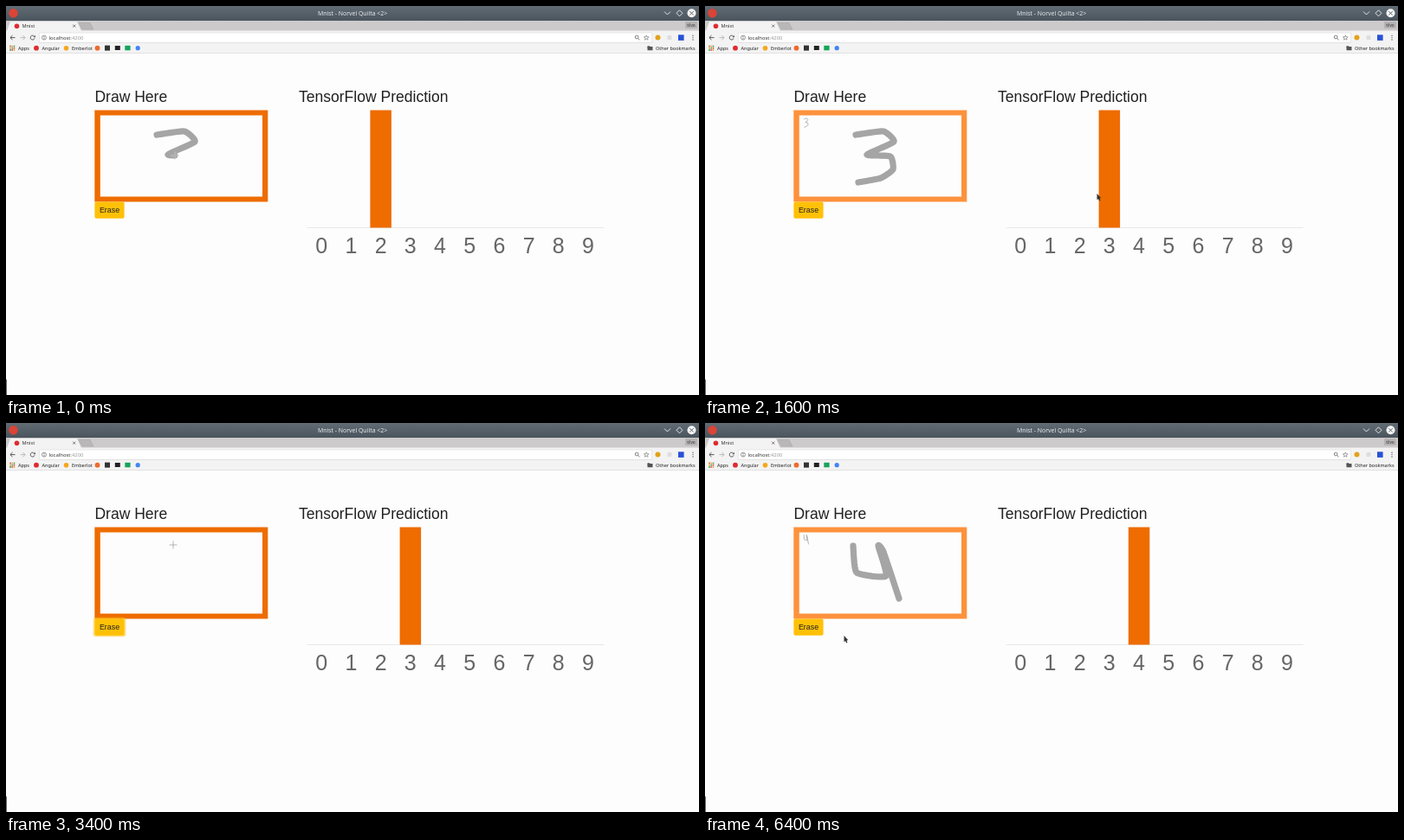
An HTML page with a canvas for the animation above (6600 ms loop, 800 by 450 pixels).

```html
<!DOCTYPE html>
<html lang="en">
<head>
<meta charset="utf-8">
<title>Digit prediction</title>
<style>
html, body { margin: 0; width: 100%; height: 100%; overflow: hidden; background: #fdfdfe; }
canvas { display: block; width: 800px; height: 450px; }
</style>
</head>
<body>
<canvas id="stage" width="800" height="450"></canvas>
<script>
const ctx = document.getElementById('stage').getContext('2d');
const LOOP = 6600, STEP = 200;
const SANS = '"Liberation Sans", Arial, sans-serif';
const UI = '"Noto Sans", sans-serif';
const PAGE = '#fdfdfe', INK = '#212121', ORANGE = '#ee6c00', HOVERED = '#d45c00';

// Moments of the story, in ms
const THREE_DONE = 400, ERASE = 3000, FOUR_START = 3800, FOUR_DONE = 5200;
const FIRST_RESULT = 433, SECOND_RESULT = 5300;
const HOVER_IN = 1750, HOVER_OUT = 2500;

// Math helpers
const clamp = v => Math.max(0, Math.min(1, v));
const easeOut = u => 1 - (1 - clamp(u)) ** 4;
const mix = (a, b, u) => a.map((v, k) => v + (b[k] - v) * u);
const inside = ([x, y], l, t, r, b) => x >= l && x <= r && y >= t && y <= b;

// Drawing helpers
function rect(x, y, w, h, color, radius = 0) {
  ctx.fillStyle = color;
  ctx.beginPath();
  ctx.roundRect(x, y, w, h, radius);
  ctx.fill();
}

function disc(x, y, r, color) {
  ctx.fillStyle = color;
  ctx.beginPath();
  ctx.arc(x, y, r, 0, 7);
  ctx.fill();
}

function ring(x, y, r, color, width, from = 0, to = 7) {
  ctx.beginPath();
  ctx.arc(x, y, r, from, to);
  ctx.strokeStyle = color;
  ctx.lineWidth = width;
  ctx.stroke();
}

function outline(points, closed) {
  ctx.beginPath();
  points.forEach(([x, y]) => ctx.lineTo(x, y));
  if (closed) ctx.closePath();
}

function trace(points, color, width, closed) {
  outline(points, closed);
  ctx.strokeStyle = color;
  ctx.lineWidth = width;
  ctx.stroke();
}

function fillPoly(points, color) {
  outline(points, true);
  ctx.fillStyle = color;
  ctx.fill();
}

function cross(x, y, r, color, width) {
  trace([[x - r, y - r], [x + r, y + r]], color, width);
  trace([[x + r, y - r], [x - r, y + r]], color, width);
}

function text(str, x, y, size, color, family = SANS, align = 'left', weight = 400) {
  ctx.font = `${weight} ${size}px ${family}`;
  ctx.textAlign = align;
  ctx.fillStyle = color;
  ctx.fillText(str, x, y);
}

// Handwriting: a smooth curve through a few key points, drawn by length
const THREE = smooth([[174, 149], [206, 145], [218, 157], [187, 172], [214, 174], [217, 189], [203, 199], [177, 204]]);
const FOUR = smooth([[171, 142], [175, 173], [209, 177], [200, 142], [206, 149], [224, 203]]);

function smooth(keys) {
  const bend = 0.25, out = [keys[0]];
  for (let i = 0; i < keys.length - 1; i++) {
    const b = keys[i], c = keys[i + 1], a = keys[i - 1] || b, d = keys[i + 2] || c;
    for (let u = 0.1; u < 1.05; u += 0.1) {
      const s = u * u * (3 - 2 * u);
      out.push([0, 1].map(k => b[k] + (c[k] - b[k]) * s
        + bend * ((c[k] - a[k]) * u * (1 - u) ** 2 - (d[k] - b[k]) * u * u * (1 - u))));
    }
  }
  return out;
}

const gap = (a, b) => Math.hypot(b[0] - a[0], b[1] - a[1]);

function portion(line, share) {
  let left = share * line.slice(1).reduce((sum, p, i) => sum + gap(line[i], p), 0);
  const out = [line[0]];
  for (let i = 1; i < line.length && left > 0; i++) {
    const d = gap(line[i - 1], line[i]);
    out.push(mix(line[i - 1], line[i], Math.min(1, left / d)));
    left -= d;
  }
  return out;
}

function writtenAt(t) {
  if (t < ERASE) return portion(THREE, clamp(0.54 + 0.46 * t / THREE_DONE));
  if (t < FOUR_START) return [];
  return portion(FOUR, clamp((t - FOUR_START) / (FOUR_DONE - FOUR_START)) ** 1.3);
}

function drawDigit(line, preview) {
  if (!line.length) return;
  ctx.lineCap = ctx.lineJoin = 'round';
  trace(line.length > 1 ? line : [line[0], line[0]], '#a5a5a5', 7.2);
  if (preview) {
    trace(line.map(([x, y]) => [116.8 + (x - 197) * 0.1, 135 + (y - 174) * 0.17]), '#999', 0.8);
  }
  ctx.lineCap = 'butt';
  ctx.lineJoin = 'miter';
}

// Pointer: follows the pen while writing, otherwise travels between stops
const STOPS = [
  { at: 400, to: [177, 204] }, { at: 600, to: [187, 220] }, { at: 1000, to: [199, 330] },
  { at: 1200, to: [213, 267] }, { at: 1600, to: [452.5, 217] }, { at: 2400, to: [452.5, 191] },
  { at: 3000, to: [126, 238] }, { at: 3200, to: [126, 238] }, { at: 3400, to: [193, 141] },
  { at: 3600, to: [171, 142] }, { at: 5200, to: [224, 203] }, { at: 5800, to: [183, 317] },
  { at: 6400, to: [160.5, 246] }
];

function pointerAt(t, line) {
  if (t <= THREE_DONE || (t >= FOUR_START && t <= FOUR_DONE)) return line[line.length - 1];
  const i = STOPS.findIndex(stop => stop.at >= t);
  const a = STOPS[i - 1], b = STOPS[i];
  return mix(a.to, b.to, (t - a.at) / (b.at - a.at));
}

function drawPointer([x, y], overPad, overButton) {
  if (overPad) {
    for (const [color, width] of [['#ffffff80', 1.5], ['#96969a', 0.7]]) {
      trace([[x - 4.5, y], [x + 4.5, y]], color, width);
      trace([[x, y - 4.5], [x, y + 4.5]], color, width);
    }
  } else if (overButton) {
    rect(x - 0.7, y - 1, 1.6, 6, '#333', 0.8);
    rect(x - 1.5, y + 2.5, 5, 5, '#333', 1.5);
  } else {
    fillPoly([[x, y], [x, y + 7], [x + 4.6, y + 5.1]], '#333');
    trace([[x + 1.6, y + 4], [x + 3.3, y + 8.2]], '#333', 1.4);
  }
}

// Browser window
function drawTitleBar() {
  const shade = ctx.createLinearGradient(0, 0, 0, 17);
  shade.addColorStop(0, '#616c75');
  shade.addColorStop(1, '#4a545d');
  rect(0, 0, 800, 17, shade);
  disc(8.5, 8.3, 5.2, '#db4437');
  text('Mnist - Norvel Quilta <2>', 400, 10.6, 6.9, '#e6e9eb', UI, 'center');
  trace([[760, 6.5], [763.5, 10], [767, 6.5]], '#f4f4f4', 0.9);
  trace([[777.5, 4.8], [781, 8.3], [777.5, 11.8], [774, 8.3]], '#f4f4f4', 0.9, true);
  disc(791.5, 8.3, 5, '#f7f7f7');
  cross(791.5, 8.3, 2.2, '#4a545d', 0.9);
}

function drawTabs() {
  rect(0, 17, 800, 12, '#cccacb');
  const idle = [[84, 19.5], [97, 19.5], [101, 27], [88, 27]];
  fillPoly(idle, '#bab7b8');
  trace(idle, '#a5a2a3', 0.5, true);
  fillPoly([[1, 29], [5, 18], [82, 18], [87, 29]], '#f3f3f3');
  disc(12.5, 23.2, 2.8, '#dd2c30');
  text('Mnist', 18.5, 25.3, 5.6, '#333', UI);
  cross(78.7, 23.1, 1.5, '#555', 0.8);
  rect(784, 18, 14, 8, '#b6b3b4', 1);
  text('tilvo', 791, 24, 4.8, '#333', UI, 'center');
}

function drawArrow(x, dir, color) {
  trace([[x, 36.6], [x + dir * 5.5, 36.6]], color, 1);
  trace([[x + dir * 3, 34], [x + dir * 5.6, 36.6], [x + dir * 3, 39.2]], color, 1);
}

function drawToolbar() {
  rect(0, 28.5, 800, 26.5, '#f3f3f3');
  rect(0, 54.3, 800, 0.7, '#dcdcdc');
  rect(38, 30.8, 708, 11.6, '#d2d2d2', 1.5);
  rect(38.5, 31.3, 707, 10.6, '#fff', 1);
  drawArrow(10.5, -1, '#555');
  drawArrow(16.5, 1, '#bbb');
  ring(30.7, 36.6, 2.5, '#555', 0.9, 0.3, 5.7);
  fillPoly([[31.4, 36.2], [33.9, 36.2], [33.9, 33.7]], '#555');
  ring(44, 36.6, 2.5, '#666', 0.7);
  rect(43.6, 35.1, 0.8, 0.8, '#666');
  rect(43.6, 36.4, 0.8, 1.8, '#666');
  text('localhost', 49.5, 38.6, 5.9, '#333', UI);
  text(':4200', 49.5 + ctx.measureText('localhost').width, 38.6, 5.9, '#999', UI);

  ring(728.2, 36, 1.9, '#666', 0.8);
  trace([[729.6, 37.4], [731.5, 39.3]], '#666', 0.9);
  const star = Array.from({ length: 10 }, (_, i) => {
    const r = i % 2 ? 1.3 : 3, a = i * Math.PI / 5;
    return [739.3 + r * Math.sin(a), 36.8 - r * Math.cos(a)];
  });
  trace(star, '#666', 0.6, true);
  disc(752.5, 36.6, 3, '#e2a21c');
  rect(763.5, 34, 5, 5, '#dedede', 1);
  rect(776, 33.3, 6.6, 6.6, '#2850d8');
  for (let i = -1; i < 2; i++) disc(793, 36.6 + i * 2.4, 0.7, '#555');
}

function drawBookmarks() {
  const tints = ['#db4437', '#e39d20', '#3a9c55'];
  for (let i = 0; i < 9; i++) {
    const row = Math.floor(i / 3);
    rect(4.3 + (i % 3) * 2.2, 45.7 + row * 2.2, 1.6, 1.6, tints[(i + row) % 3]);
  }
  const label = (str, x) => text(str, x, 50.8, 5.5, '#222', UI);
  label('Apps', 14);
  disc(35, 48.7, 2.9, '#dd2c30');
  label('Angular', 41.5);
  disc(69.5, 48.7, 2.8, '#f6a71c');
  label('Emberlot', 76);
  disc(105.5, 48.7, 2.9, '#ee6b2d');
  rect(114, 45.6, 6, 6, '#333');
  rect(125.8, 46, 6, 5, '#222');
  rect(137.3, 45.8, 6.3, 5.5, '#16a45b');
  disc(152.2, 48.7, 2.6, '#4285f4');
  rect(740.5, 46.2, 2.8, 2, '#555', 0.5);
  rect(740.5, 46.9, 6, 4.4, '#555', 0.5);
  label('Other bookmarks', 750);
}

// Page
function drawPad(t, line, hover) {
  text('Draw Here', 102.4, 111, 17.55, INK);
  rect(102.3, 120.5, 200, 106, hover ? ORANGE : '#fd923c');
  rect(108.8, 126.6, 187.2, 93.9, PAGE);
  drawDigit(line, t > SECOND_RESULT || (t > FIRST_RESULT && t < ERASE));
}

function drawButton(t, hover) {
  if (t >= ERASE && t < FOUR_START) rect(100.7, 224.8, 37.6, 22.4, 'rgba(255,193,7,.5)', 3);
  rect(102.4, 226.5, 34.2, 19.2, hover ? '#e9b006' : '#ffc107', 2);
  text('Erase', 119.5, 239.4, 8.9, INK, SANS, 'center');
}

function drawChart(t, hover) {
  const first = easeOut((t - FIRST_RESULT) / 1000), second = easeOut((t - SECOND_RESULT) / 1000);
  const shares = { 2: 1 - first, 3: first * (1 - second), 4: second };
  text('TensorFlow Prediction', 338, 111, 17.55, INK);
  rect(347.5, 256, 343, 0.8, '#e2e2e2');
  for (let d = 0; d < 10; d++) {
    const center = 364.2 + d * 34.2, h = (shares[d] || 0) * 136;
    const bar = color => rect(center - 12.2, 256.5 - h, 24.5, h, color);
    bar(ORANGE);
    if (d === 3) {
      ctx.globalAlpha = hover;
      bar(HOVERED);
      ctx.globalAlpha = 1;
    }
    text(d, center, 286, 25, '#666', SANS, 'center');
  }
}

function drawTooltip(alpha) {
  ctx.globalAlpha = alpha;
  const shade = 'rgba(0,0,0,.82)';
  rect(435.5, 124.7, 62, 26.8, shade, 3.5);
  fillPoly([[463.3, 124.7], [466.6, 121.3], [469.9, 124.7]], shade);
  text('3', 439.3, 135.6, 7.4, '#fff', SANS, 'left', 700);
  rect(439.3, 140, 7.8, 7.8, '#fff');
  rect(440, 140.7, 6.4, 6.4, HOVERED);
  text('Predictions: 1', 448.2, 146.6, 7.5, '#fff');
  ctx.globalAlpha = 1;
}

function draw(t) {
  const line = writtenAt(t);
  const pointer = pointerAt(t, line);
  const overPad = inside(pointer, 102, 120, 302, 226);
  const overButton = inside(pointer, 102, 226.5, 137, 246);
  const hover = easeOut((t - HOVER_IN) / 400) * (1 - easeOut((t - HOVER_OUT) / 400));
  rect(0, 0, 800, 450, PAGE);
  drawTitleBar();
  drawTabs();
  drawToolbar();
  drawBookmarks();
  drawPad(t, line, overPad);
  drawButton(t, overButton);
  drawChart(t, hover);
  drawTooltip(hover);
  rect(0, 432, 0.9, 18, '#555');
  drawPointer(pointer, overPad, overButton);
}

function tick() {
  const t = performance.now() % LOOP;
  draw(Math.floor(t / STEP) * STEP);
  requestAnimationFrame(tick);
}
tick();
</script>
</body>
</html>
```
